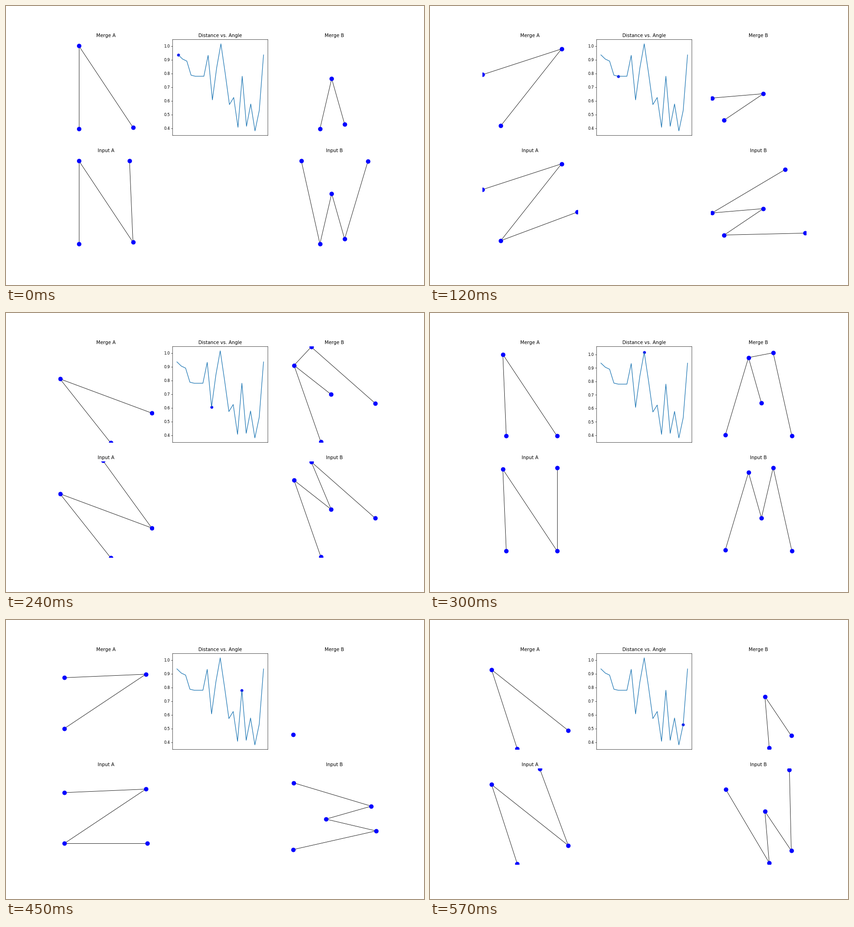
Recreate the animation shown at these times as a matplotlib script. Size 917 by 611 pixels, loop 0.6 s.

```python
import numpy as np
import matplotlib.pyplot as plt
from matplotlib.animation import FuncAnimation
from matplotlib.collections import LineCollection

W, H = 917, 611
DPI = W / 15
STEPS = 20
EPS = 1e-6  # guards against the canvas size rounding down

# Vertices of each polyline, in pixels around the panel centre
LETTER_N = np.array([(-59.4, -91), (-59.4, 91), (59.4, -87.6), (51.8, 91)])
LETTER_W = np.array([(-73, 91), (-32.1, -91), (-6.3, 19), (22.1, -80.6), (73, 89.3)])

DIST = np.array([.9354, .905, .890, .787, .7795, .7795, .7795, .932, .607, .841,
                 1.016, .802, .573, .6245, .407, .7795, .4145, .577, .381, .530, .9354])

plt.rcParams["font.family"] = "DejaVu Sans"
fig = plt.figure(figsize=(W / DPI + EPS, H / DPI + EPS), dpi=DPI, facecolor="white")
fig.subplots_adjust(left=.125, right=.9, bottom=.125, top=.88, wspace=.2, hspace=.2)


class GraphPanel:
    def __init__(self, slot, title):
        self.ax = ax = fig.add_subplot(2, 3, slot)
        ax.set_title(title)
        ax.axis("off")
        box = ax.get_position()
        half_w, half_h = box.width * W / 2, box.height * H / 2
        ax.set_xlim(-half_w, half_w)
        ax.set_ylim(-half_h, half_h)
        self.edges = LineCollection([], colors="black", linewidths=1, zorder=1)
        ax.add_collection(self.edges, autolim=False)
        self.nodes = ax.scatter([], [], s=100, c="blue", linewidths=1.5, zorder=2)

    def show(self, pts, nodes, edges):
        self.nodes.set_offsets(pts[nodes])
        self.edges.set_segments([pts[list(e)] for e in edges])


def rotate(pts, angle):
    """Turn clockwise."""
    c, s = np.cos(angle), np.sin(angle)
    x, y = pts.T
    return np.column_stack([x * c + y * s, y * c - x * s])


def recentre(pts):
    return pts - (pts.min(axis=0) + pts.max(axis=0)) / 2


def merge_tree(heights):
    """Sublevel-set merge tree of a path: its nodes and edges."""
    comp, top = {}, {}
    nodes, edges = [], []
    for i in np.argsort(heights, kind="stable"):
        below = [comp[j] for j in (i - 1, i + 1) if j in comp]
        if len(below) == 1:
            comp[i] = below[0]
            continue
        nodes.append(i)
        edges += [(i, top[b]) for b in below]
        for j in comp:
            if comp[j] in below:
                comp[j] = i
        comp[i] = top[i] = i
    return nodes, edges


def path_edges(n):
    return [(i, i + 1) for i in range(n - 1)]


pairs = [
    (LETTER_N, GraphPanel(1, "Merge A"), GraphPanel(4, "Input A")),
    (LETTER_W, GraphPanel(3, "Merge B"), GraphPanel(6, "Input B")),
]

chart = fig.add_subplot(2, 3, 2)
chart.set_title("Distance vs. Angle")
chart.set_xticks([])
chart.set_yticks(np.arange(4, 11) / 10)
chart.plot(np.arange(STEPS + 1), DIST, color="C0", lw=1.5, zorder=2)
dot = chart.scatter([0], [DIST[0]], s=36, c="blue", linewidths=1.5, zorder=1)


def padded(lo, hi, centre):
    """Limits that hold the data and the whole dot, plus 5 % on each side."""
    r = .0162 * (hi - lo)
    lo, hi = min(lo, centre - r), max(hi, centre + r)
    pad = .05 * (hi - lo)
    return lo - pad, hi + pad


def update(k):
    angle = 2 * np.pi * k / STEPS
    for shape, tree, graph in pairs:
        turned = rotate(shape, angle)
        pts = recentre(turned)
        tree.show(pts, *merge_tree(turned[:, 1]))
        graph.show(pts, list(range(len(pts))), path_edges(len(pts)))
    dot.set_offsets([(k, DIST[k])])
    chart.set_xlim(*padded(0, STEPS, k))
    chart.set_ylim(*padded(DIST.min(), DIST.max(), DIST[k]))
    return []


anim = FuncAnimation(fig, update, frames=STEPS, interval=30, repeat=True,
                     repeat_delay=0, blit=False)
plt.show()
```
